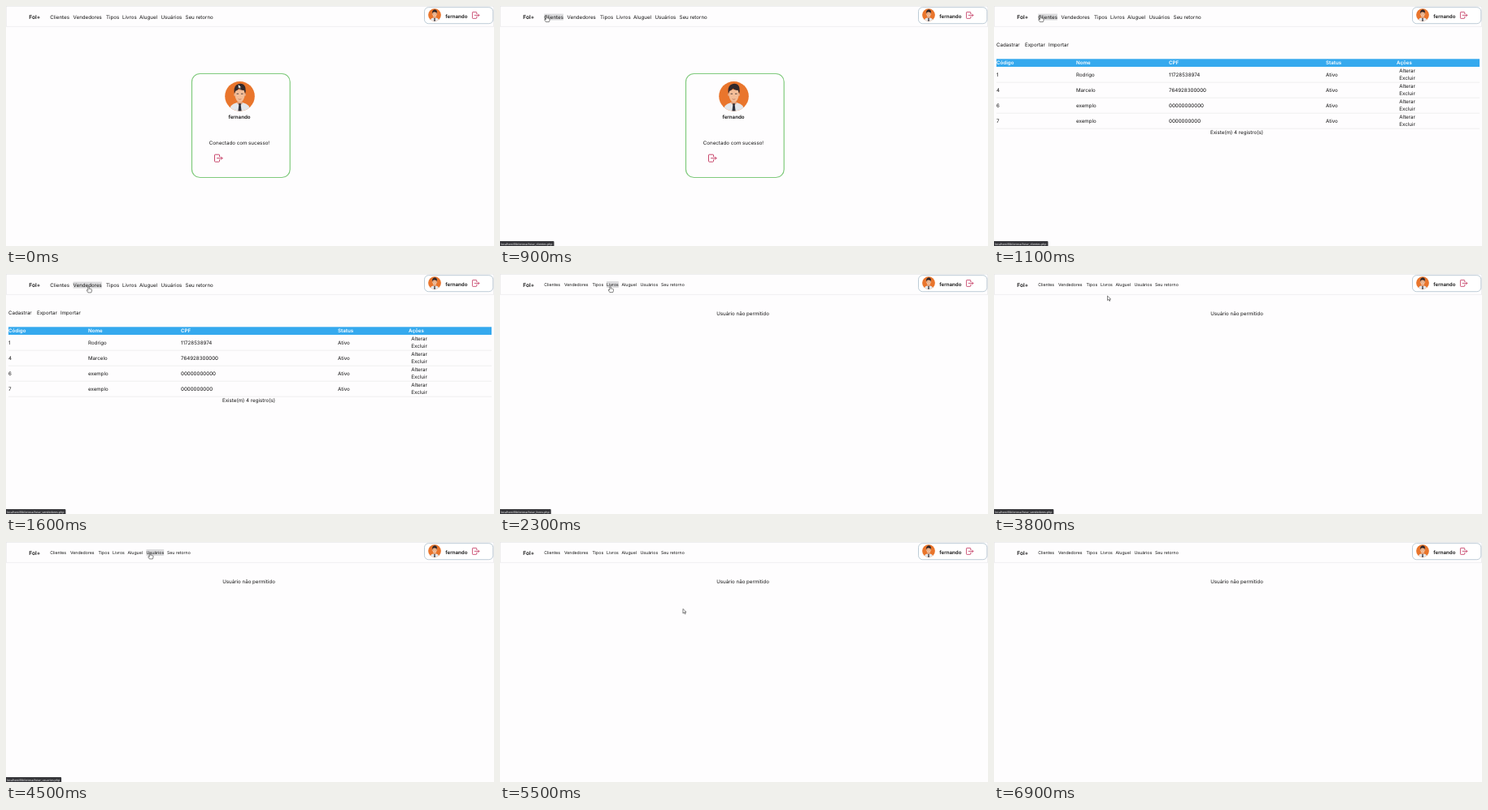
These frames come from a looping animation (600x296 px, 7 s). An HTML page:

```html
<!DOCTYPE html>
<html lang="pt">
<head>
<meta charset="utf-8">
<title>Biblioteca</title>
<style>
html, body { margin: 0; width: 100%; height: 100%; overflow: hidden; background: #fefdfe; }
svg { display: block; width: 600px; height: 296px; }
text { font: 6.2px Inter, "Open Sans", sans-serif; fill: #111; text-rendering: geometricPrecision; }
.b { font-weight: 600; }
.logo { font-size: 6.6px; }
.mid { text-anchor: middle; }
.small text { font-size: 5.2px; }
.head text { fill: #fff; font-weight: 600; }
.url { font: 3.55px "Open Sans", "Noto Sans", sans-serif; fill: #fff; }
.line { fill: none; stroke: #e4e4e6; stroke-width: .6; }
</style>
</head>
<body>
<svg viewBox="0 0 600 296">
  <defs>
    <clipPath id="disc"><circle r="18.3"/></clipPath>
    <g id="avatar">
      <circle r="18.3" fill="#e9752c"/>
      <g clip-path="url(#disc)">
        <path d="M-13 19Q-13 10-4 8H4Q13 10 13 19Z" fill="#e3e6ea"/>
        <path d="M-3 4H3V9L0 12-3 9Z" fill="#e2a27c"/>
        <path d="M-1.6 9H1.6L1.2 11 2.2 19H-2.2L-1.2 11Z" fill="#30333d"/>
      </g>
      <ellipse cx="-6.3" cy="-2" rx="1.2" ry="2" fill="#e2a27c"/>
      <ellipse cx="6.3" cy="-2" rx="1.2" ry="2" fill="#e2a27c"/>
      <path d="M-6-8H6V-1Q5.500 6 0 7.500-5.500 6-6-1Z" fill="#f3bd98"/>
      <path d="M-6.600-3Q-8-11-4-14 0-17 4.500-14.500 8.500-11 6.600-3L5-7.500Q1-7-1-9.500-3-7-5.200-6.500Z" fill="#33282a"/>
      <path d="M-4-3H-1.500M1.500-3H4" stroke="#33282a" stroke-width=".8"/>
      <path d="M-1.800 3.400Q0 4.600 1.800 3.400" fill="none" stroke="#b06a50" stroke-width=".7"/>
    </g>
    <g id="exit" fill="none" stroke="#c8466c" stroke-width="1" stroke-linecap="round" stroke-linejoin="round">
      <path d="M6.500 3V1.200Q6.500.5 5.800.5H1.200Q.5.5.5 1.200V8.800Q.5 9.500 1.200 9.500H5.800Q6.500 9.500 6.500 8.800V7M3.500 5H10M8.200 3.200 10 5 8.200 6.800"/>
    </g>
  </defs>

  <rect class="line" x=".3" y=".3" width="599.4" height="24.9"/>
  <rect id="glow" height="8" fill="#dcdcde"/>
  <text class="b logo" x="28.3" y="15.700">Fol+</text>
  <g id="navBig"></g>
  <g id="navSmall" class="small"></g>
  <rect x="514.5" y="1.700" width="84.300" height="20" rx="5" fill="#fff" stroke="#adbfcc" stroke-width=".8"/>
  <use href="#avatar" transform="translate(527 11) scale(.43)"/>
  <text class="b" x="540.3" y="15.200">fernando</text>
  <use href="#exit" transform="translate(573 7) scale(.88)"/>

  <g id="card">
    <rect x="228.500" y="83.500" width="120.700" height="128" rx="10" fill="none" stroke="#80ca7d" stroke-width="1.200"/>
    <use href="#avatar" x="287.500" y="111.300"/>
    <text class="b mid" x="287" y="138.600">fernando</text>
    <text class="mid" x="287" y="170.700">Conectado com sucesso!</text>
    <use href="#exit" x="256" y="182.700"/>
  </g>

  <g id="table">
    <rect x="3" y="65.300" width="594" height="9.700" fill="#35a9ee"/>
    <g id="head" class="head"></g>
    <g id="rows"></g>
    <text class="mid" x="298.500" y="158.200">Existe(m) 4 registro(s)</text>
  </g>

  <text id="denied" class="mid" x="298.500" y="50.500">Usuário não permitido</text>

  <g id="status">
    <rect id="bar" x="-2" y="290" height="8" rx="1" fill="#36363a"/>
    <text id="url" class="url" x="1" y="294.500"></text>
  </g>

  <path id="arrow" d="M0 0V5.600L1.400 4.300 2.400 6.400 3.300 6 2.400 4H4.100Z" fill="#fff" stroke="#222" stroke-width=".55"/>
  <path id="hand" d="M-.7.700Q0-.5.700.700V3Q1.500 2.500 2 3.200 2.800 2.800 3.200 3.500 4 3.400 4 4.200V5.600L3.300 7.600H-.6L-2.200 5Q-2.200 4-1.300 4.400L-.7 5Z" fill="#fff" stroke="#222" stroke-width=".55"/>
</svg>
<script>
const LOOP = 7000, STEP = 100;
const OPEN_TABLE = 1000, OPEN_DENIED = 1700;
const $ = id => document.getElementById(id);

function add(parent, tag, attrs, label) {
  const el = document.createElementNS("http://www.w3.org/2000/svg", tag);
  for (const key in attrs) el.setAttribute(key, attrs[key]);
  if (label) el.textContent = label;
  return parent.appendChild(el);
}
const write = (parent, x, y, label) => add(parent, "text", { x, y }, label);
const show = (el, on) => el.setAttribute("visibility", on ? "visible" : "hidden");

const links = ["Clientes", "Vendedores", "Tipos", "Livros", "Aluguel", "Usuários", "Seu retorno"];
const files = ["clientes", "vendedores", "tipos", "livros", "aluguel", "usuarios", "retorno"];
const bigX = [54.3, 82.6, 123, 143, 164, 190.5, 220.5];
const smallX = [54.3, 79, 113.5, 131, 149.5, 172.5, 198];
links.forEach((label, i) => {
  write($("navBig"), bigX[i], 15.7, label);
  write($("navSmall"), smallX[i], 14.9, label);
});

const cols = [3, 101, 215, 408, 495];
["Código", "Nome", "CPF", "Status", "Ações"].forEach((s, i) => write($("head"), cols[i], 72.2, s));
[["Cadastrar", 3], ["Exportar", 38], ["Importar", 67]].forEach(([s, x]) => write($("table"), x, 50.3, s));
[
  ["1", "Rodrigo", "11728538974", "Ativo"],
  ["4", "Marcelo", "764928300000", "Ativo"],
  ["6", "exemplo", "00000000000", "Ativo"],
  ["7", "exemplo", "0000000000", "Ativo"]
].forEach((row, i) => {
  const y = 87 + 19 * i, g = $("rows");
  row.forEach((s, c) => write(g, cols[c], y, s));
  write(g, 498.3, y - 5, "Alterar");
  write(g, 498.3, y + 4.3, "Excluir");
  add(g, "path", { class: "line", d: `M3 ${y + 7.2}H597` });
});

// Pointer stops: time, x, y
const stops = [
  [0, 285.5, 96.5], [700, 57, 12], [1100, 57, 12], [1500, 101.5, 15.3], [1700, 101.5, 15.3],
  [2000, 119, 15], [2100, 119, 15], [2300, 135.5, 15], [2900, 135.5, 15], [3400, 98, 14],
  [3600, 104, 13], [3800, 139.5, 27], [4000, 139.5, 27], [4400, 177, 13.3], [4600, 177, 13.3],
  [4800, 212, 13], [4900, 212, 13], [5400, 222, 90], [6000, 262, -12], [LOOP, 262, -12]
];

function pointer(t) {
  const i = stops.findIndex(s => s[0] > t);
  const [t0, x0, y0] = stops[i - 1], [t1, x1, y1] = stops[i];
  const u = (t - t0) / (t1 - t0), k = u * u * (3 - 2 * u);
  return [x0 + (x1 - x0) * k, y0 + (y1 - y0) * k];
}

const navAt = t => $(t < OPEN_DENIED ? "navBig" : "navSmall").children;
const xOf = el => +el.getAttribute("x");

function hovered(t) {
  if (t < 0) return -1;
  const [x, y] = pointer(t);
  if (y < 9 || y > 18) return -1;
  return [...navAt(t)].findIndex(el => x >= xOf(el) && x <= xOf(el) + el.getComputedTextLength());
}

function draw(t) {
  const denied = t >= OPEN_DENIED;
  show($("card"), t < OPEN_TABLE);
  show($("table"), t >= OPEN_TABLE && !denied);
  show($("denied"), denied);
  show($("navBig"), !denied);
  show($("navSmall"), denied);

  const hit = hovered(t), over = hit >= 0;
  show($("glow"), over);
  if (over) {
    const el = navAt(t)[hit];
    $("glow").setAttribute("x", xOf(el));
    $("glow").setAttribute("y", denied ? 9 : 9.6);
    $("glow").setAttribute("width", el.getComputedTextLength());
  }

  // The address lingers briefly after the pointer leaves a link
  const recent = [0, 1, 2].map(n => hovered(t - n * STEP)).find(n => n >= 0);
  show($("status"), recent !== undefined);
  if (recent !== undefined) {
    $("url").textContent = `localhost/Biblioteca/listar_${files[recent]}.php`;
    $("bar").setAttribute("width", $("url").getComputedTextLength() + 5);
  }

  const [x, y] = pointer(t);
  for (const id of ["arrow", "hand"]) {
    $(id).setAttribute("transform", `translate(${x} ${y})`);
    show($(id), over === (id === "hand"));
  }
}

let start;
function tick(now) {
  start ??= now;
  draw(Math.floor((now - start) % LOOP / STEP) * STEP);
  requestAnimationFrame(tick);
}
draw(0);
requestAnimationFrame(tick);
</script>
</body>
</html>
```
